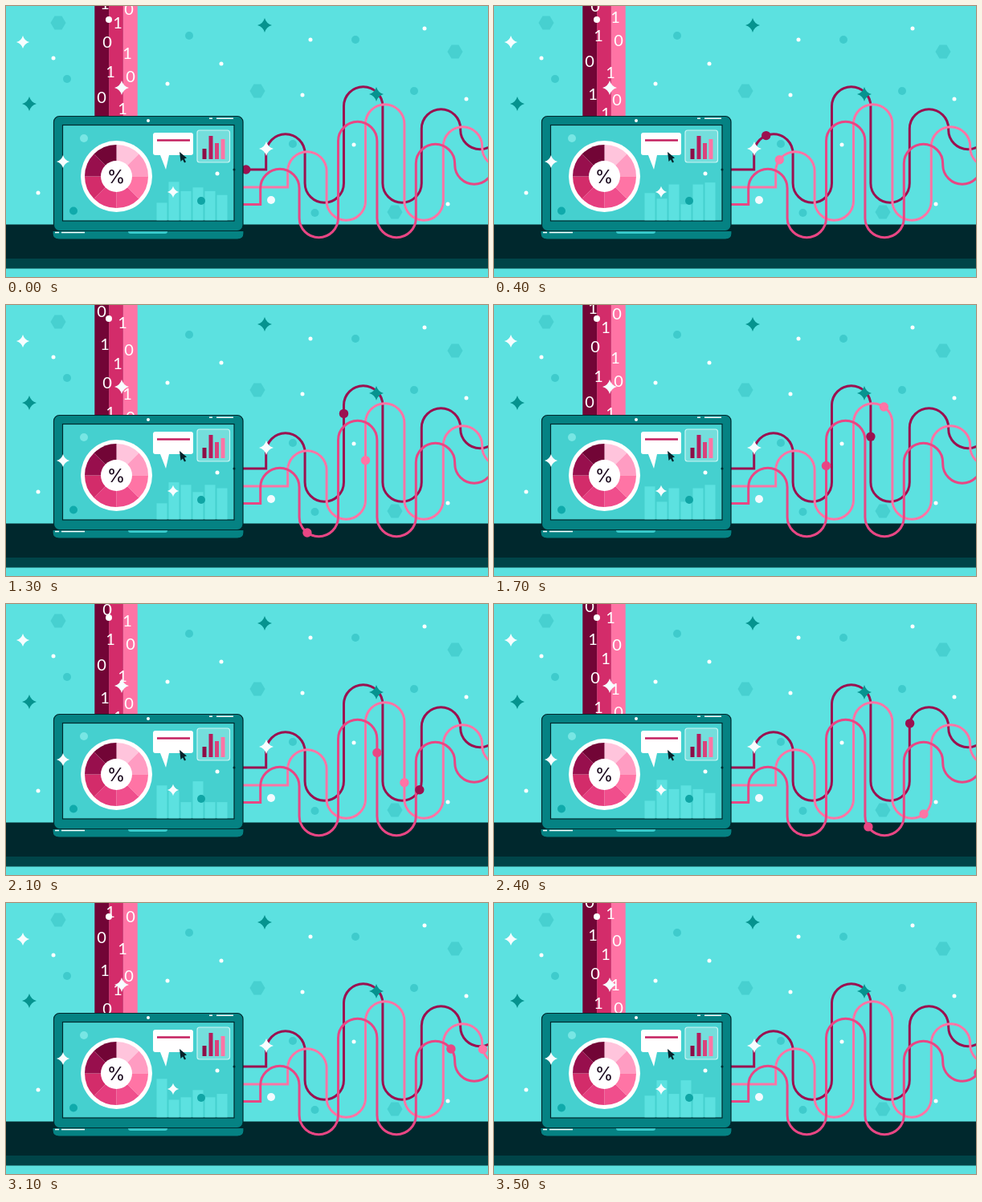
Animation, 600 px wide and 338 px high, one loop 3.6 s. Source, as an HTML page:

```html
<!DOCTYPE html>
<html lang="en">
<head>
<meta charset="utf-8">
<title>Data stream</title>
<style>
html, body { margin: 0; width: 100%; height: 100%; overflow: hidden; background: #5ce1e0; }
svg { display: block; width: 100%; height: 100%; }
text { text-anchor: middle; font-family: Lato, "DejaVu Sans", sans-serif; }
#percent { font-family: Inter, "Liberation Sans", sans-serif; }
</style>
</head>
<body>
<svg viewBox="0 0 600 338">
  <rect width="600" height="338" fill="#5ce1e0"/>
  <path d="M0 272.5H600V315H0Z" fill="#00282d"/>
  <path d="M0 315H600V327.5H0Z" fill="#004448"/>
  <g id="backdrop" fill="#47d0d0"></g>
  <g id="ribbon"></g>
  <g id="digits" fill="#fff" font-size="20"></g>
  <g id="wires" fill="none" stroke-width="3"></g>
  <g id="pulses"></g>

  <g stroke="#00282d" stroke-width="1.2">
    <rect x="59.5" y="137.5" width="235.5" height="143" rx="7" fill="#058283"/>
    <rect x="70.5" y="148.5" width="213.5" height="119.5" fill="#45d0cf"/>
    <path d="M58 280.5H296V284Q296 291 288 291H66Q58 291 58 284Z" fill="#058283"/>
  </g>
  <path d="M152 281H201Q201 284 198 284H155Q152 284 152 281Z" fill="#38c9ca"/>
  <path d="M253 140.300h4M262 140.300h21M61 282.500h5M69 282.500h29" stroke="#fff" stroke-width="1.5"/>
  <circle cx="177" cy="143" r="2" fill="#fff"/>
  <circle cx="284" cy="204" r="1.5" fill="#00282d"/>
  <g id="bars" fill="#5ce1e0"></g>

  <circle cx="137.5" cy="212.5" r="44.5" fill="#fff"/>
  <g id="pie"></g>
  <circle cx="137.5" cy="212.5" r="19.5" fill="#fff"/>
  <text id="percent" x="137" y="220.5" font-size="23" fill="#1b0a1e">%</text>

  <path d="M186 158H230Q233 158 233 161V183Q233 186 230 186H203L199 204L192 186H186Q183 186 183 183V161Q183 158 186 158Z" fill="#fff"/>
  <path d="M188 167.500H229" stroke="#c41f5f" stroke-width="2.5"/>
  <path d="M216 182L217.500 194L220 191.500L222 195.500L224 194.500L222 190.500L225 189.500Z" fill="#06232b"/>
  <rect x="238" y="155" width="40.5" height="40" rx="3" fill="#74dedc" stroke="#c9f5f4" stroke-width="1.2"/>
  <path d="M244.500 178h5v13h-5z" fill="#8c0d47"/>
  <path d="M252.500 162h5v29h-5z" fill="#b51c5c"/>
  <path d="M260 171h5v20h-5z" fill="#d9427c"/>
  <path d="M267.500 166h5v25h-5z" fill="#ff74a5"/>
  <g id="sparkles"></g>
</svg>
<script>
function add(parent, tag, attrs) {
  const el = document.createElementNS("http://www.w3.org/2000/svg", tag);
  for (const k in attrs) el.setAttribute(k, attrs[k]);
  document.getElementById(parent).append(el);
  return el;
}
const dot = (parent, cx, cy, r, fill) => add(parent, "circle", { cx, cy, r, fill });

// Still decoration
for (const [x, y] of [[65, 21], [313, 106], [559, 57], [484, 257]])
  add("backdrop", "path", { d: `M${x - 9.5} ${y}l5-8.500h9l5 8.500l-5 8.500h-9z` });
for (const [x, y] of [[76, 91], [228, 37], [435, 42], [508, 106], [357, 172], [384.5, 258]])
  dot("backdrop", x, y, 5, "#3fcbcc");
for (const [x, y] of [[59, 65], [201, 97], [268, 72], [379, 42], [369, 111], [521, 28], [573, 116], [433, 173], [550, 247], [40, 233], [263, 209]])
  dot("sparkles", x, y, 2.5, "#fff");
dot("sparkles", 128, 17, 4, "#fff");
dot("sparkles", 330, 242, 5, "#f3fbff");
dot("sparkles", 97, 165, 5, "#78e6e4");
dot("sparkles", 84, 255.5, 5, "#10aaab");
dot("sparkles", 243, 243, 5, "#10a5a5");

const star = "M0-9Q2-2 9 0Q2 2 0 9Q-2 2-9 0Q-2-2 0-9Z";
const teal = "#06938f", white = "#f7fdff";
for (const [x, y, size, fill] of [[21, 45, .9, white], [29, 122, 1, teal], [322, 24, 1, teal], [71, 194, .9, white],
  [144, 102, 1, white], [324, 178, 1, white], [461, 110, 1, teal], [208, 232, .8, white]])
  add("sparkles", "path", { d: star, fill, transform: `translate(${x} ${y}) scale(${size})` });

["#720536", "#d32c6a", "#ff74a5"].forEach((fill, i) =>
  add("ribbon", "rect", { x: 110.3 + 17.8 * i, width: 17.8, height: 140, fill }));
["#ffc4dc", "#ff9cc2", "#ff74a5", "#f04e8c", "#e53d7e", "#d32c6a", "#980f4d", "#720536"].forEach((fill, i) =>
  add("pie", "path", { d: "M0 0V-39.500A39.500 39.500 0 0 1 27.930-27.930Z", fill, transform: `translate(137.500 212.500) rotate(${i * 45})` }));

// Falling digits: character, x and starting height
const period = 158, fall = 28.3;
const digits = [[0, 119, 114], [1, 123, -3], [0, 126, 45], [1, 130, 82], [1, 145, 128],
  [1, 139, 21], [0, 153, 4], [1, 151, 59], [0, 155, 88]].map(([char, x, y]) => {
  const el = add("digits", "text", { x });
  el.textContent = char;
  return { el, y };
});

// Each wire is the same wave; a pulse's distance is measured from its first corner
const arch = "a24.200 24.200 0 0 1 48.400 0", dip = "a24.200 24.200 0 0 0 48.400 0";
const wave = `v-20${arch}v37${dip}v-96${arch}v96${dip}v-68${arch}v1.500${dip}${arch}`;
const ease = t => 373 + 450 * Math.sin(.07 * (t - 15.5));
const wires = [
  [323.7, 204, "#9b1150", ease],
  [350.7, 226, "#ff74a5", t => 24.8 * t - 64],
  [316.7, 247.5, "#e94684", t => ease(t - 4.7)]
].map(([x, y, color, way]) => ({
  path: add("wires", "path", { d: `M285 ${y}H${x}${wave}`, stroke: color }),
  pulse: dot("pulses", 0, 0, 5.7, color),
  lead: x - 285, way
}));

// Bars share one swing and differ in phase (degrees)
const bars = [210, 0, 80, 300, 80, 100].map((phase, i) =>
  ({ phase, el: add("bars", "rect", { x: 187.5 + i * 15, width: 13 }) }));

function draw() {
  const t = Math.floor(performance.now() / 100) % 36; // tenths of a second
  for (const { el, y } of digits)
    el.setAttribute("y", (y + fall * t + 15 + period) % period - 8);
  for (const { path, pulse, lead, way } of wires) {
    const p = path.getPointAtLength(Math.max(0, lead + way(t)));
    pulse.setAttribute("cx", p.x);
    pulse.setAttribute("cy", p.y);
  }
  for (const { el, phase } of bars) {
    const height = 34 + 14 * Math.cos((30 * t - phase) * Math.PI / 180);
    el.setAttribute("y", 267.3 - height);
    el.setAttribute("height", height);
  }
  requestAnimationFrame(draw);
}
draw();
</script>
</body>
</html>
```
